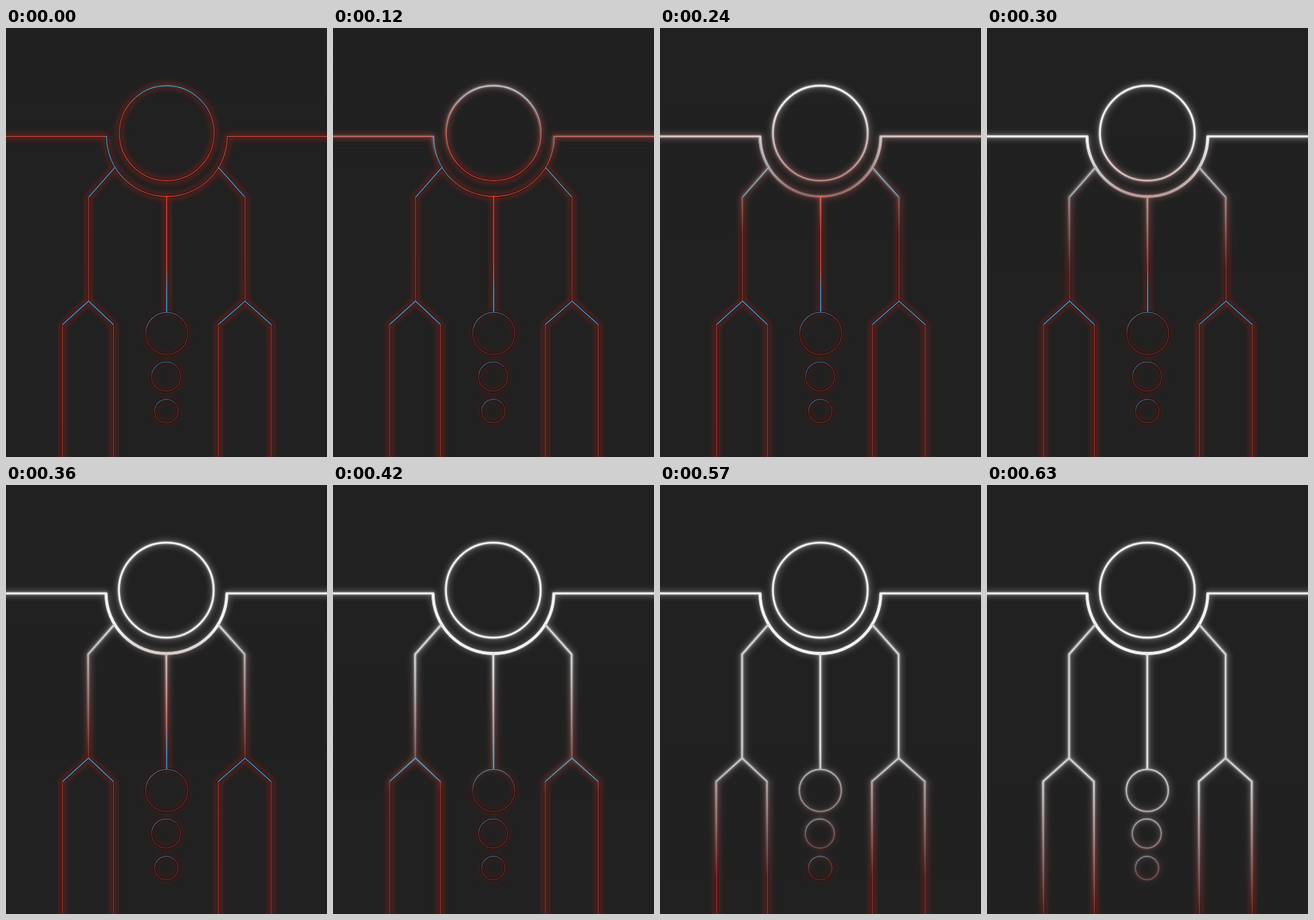
These frames come from a looping animation (420 by 560 pixels, 0.87 s). An HTML page:

```html
<!DOCTYPE html>
<html lang="en">
<head>
<meta charset="utf-8">
<title>Circuit glow</title>
<style>
  html, body { margin: 0; width: 100%; height: 100%; overflow: hidden; background: #212121; }
  svg { position: absolute; left: 0; top: 0; width: 420px; height: 560px; background: #212121; fill: none; }

  .glow { filter: url(#soft); }
  .halo { filter: url(#tight); }

  /* Lit layer: a soft edge sweeps down, then rests */
  .lit {
    --edge: 960px;
    -webkit-mask: linear-gradient(#000 790px, transparent var(--edge)) 0 0 / 100% var(--edge) no-repeat;
    mask: linear-gradient(#000 790px, transparent var(--edge)) 0 0 / 100% var(--edge) no-repeat;
    animation: sweep 870ms infinite;
  }
  @keyframes sweep {
    0% { -webkit-mask-position: 0 -868px; mask-position: 0 -868px; animation-timing-function: steps(21, end); }
    72.4138%, 100% { -webkit-mask-position: 0 -402px; mask-position: 0 -402px; }
  }
</style>
</head>
<body>
<svg viewBox="0 0 420 560">
  <defs>
    <path id="frame" d="M-20 141.5H131.5A78.5 78 0 0 0 289.5 141.5H440"/>
    <circle id="ring" cx="210.3" cy="137.3" r="62"/>
    <path id="limbs" d="M142.5 182L108 221V356.5M74 580V387L108 356.5L140.5 387V580
                        M278 182L312.8 221V356.5M277.8 580V387L312.8 356.5L347 387V580"/>
    <path id="stem" d="M210.3 219V371"/>
    <g id="orbs">
      <circle cx="210.3" cy="398.7" r="27.5"/>
      <circle cx="209.5" cy="455" r="19"/>
      <circle cx="209.8" cy="500" r="15.3"/>
    </g>
    <g id="lines">
      <use href="#frame"/><use href="#ring"/><use href="#limbs"/><use href="#stem"/>
    </g>

    <filter id="soft" filterUnits="userSpaceOnUse" x="-20" y="-20" width="460" height="600">
      <feGaussianBlur stdDeviation="4"/>
    </filter>
    <filter id="tight" filterUnits="userSpaceOnUse" x="-20" y="-20" width="460" height="600">
      <feGaussianBlur stdDeviation="1.1"/>
    </filter>

    <linearGradient id="frameInk" gradientUnits="userSpaceOnUse" x1="0" x2="420" y1="0" y2="0">
      <stop offset=".305" stop-color="#c2493c"/>
      <stop offset=".312" stop-color="#4a8fb4"/>
      <stop offset=".345" stop-color="#41829f"/>
      <stop offset=".4" stop-color="#a83a30"/>
      <stop offset=".5" stop-color="#d8402c"/>
      <stop offset=".64" stop-color="#a03a32"/>
      <stop offset=".69" stop-color="#b0483e"/>
      <stop offset=".7" stop-color="#c2493c"/>
    </linearGradient>
    <linearGradient id="ringInk" gradientUnits="userSpaceOnUse" x1="218" x2="200" y1="75" y2="200">
      <stop offset="0" stop-color="#3f97c4"/>
      <stop offset=".1" stop-color="#4189ad"/>
      <stop offset=".27" stop-color="#b0453b"/>
      <stop offset=".5" stop-color="#b83226"/>
      <stop offset="1" stop-color="#d8402e"/>
    </linearGradient>
    <linearGradient id="limbInk" gradientUnits="userSpaceOnUse" x1="0" x2="0" y1="182" y2="560">
      <stop offset="0" stop-color="#4295bd"/>
      <stop offset=".1" stop-color="#4295bd"/>
      <stop offset=".104" stop-color="#a83a32"/>
      <stop offset=".46" stop-color="#a62f26"/>
      <stop offset=".462" stop-color="#3f9ccb"/>
      <stop offset=".54" stop-color="#3f9ccb"/>
      <stop offset=".545" stop-color="#a83228"/>
      <stop offset="1" stop-color="#a83026"/>
    </linearGradient>
    <linearGradient id="stemInk" gradientUnits="userSpaceOnUse" x1="0" x2="0" y1="219" y2="371">
      <stop offset="0" stop-color="#e23c28"/>
      <stop offset=".58" stop-color="#d8412f"/>
      <stop offset=".76" stop-color="#6f7f94"/>
      <stop offset=".85" stop-color="#3498cb"/>
    </linearGradient>
    <linearGradient id="orbInk" x1=".2" x2=".6" y1="0" y2="1">
      <stop offset="0" stop-color="#3f7f9f"/>
      <stop offset=".22" stop-color="#41657a"/>
      <stop offset=".4" stop-color="#702a26"/>
      <stop offset="1" stop-color="#7c2c27"/>
    </linearGradient>
  </defs>

  <g class="glow" stroke="#b4241a" stroke-width="5" opacity=".62">
    <use href="#lines"/>
    <use href="#orbs" opacity=".35"/>
  </g>
  <g stroke="#120f0f" stroke-opacity=".75" stroke-width="3">
    <use href="#lines"/>
    <use href="#orbs"/>
  </g>
  <g stroke-width="1.3">
    <use href="#frame" stroke="url(#frameInk)"/>
    <use href="#ring" stroke="url(#ringInk)"/>
    <use href="#limbs" stroke="url(#limbInk)"/>
    <use href="#stem" stroke="url(#stemInk)" stroke-width="1.6"/>
    <use href="#orbs" stroke="url(#orbInk)" stroke-width="1.1"/>
  </g>
</svg>

<svg class="lit" viewBox="0 0 420 560">
  <g class="glow" stroke="#b9b9b9" stroke-width="5" opacity=".55">
    <use href="#lines"/>
    <use href="#orbs" opacity=".7"/>
  </g>
  <g class="halo" stroke="#ddd" stroke-width="3.4" opacity=".6" transform="translate(-.6 0)">
    <use href="#lines"/>
    <use href="#orbs" stroke-width="2.4"/>
  </g>
  <g stroke="#f2f2f2" stroke-width="2.2" transform="translate(-.6 0)">
    <use href="#frame" stroke-width="2.6"/>
    <path d="M131.5 141.5A78.5 78 0 0 0 289.5 141.5" stroke-width="3.8"/>
    <use href="#ring" stroke-width="2.4"/>
    <use href="#limbs" stroke="#d6d6d6" stroke-width="2"/>
    <use href="#stem" stroke="#e2e2e2"/>
    <use href="#orbs" stroke="#cfcfcf" stroke-width="1.5"/>
  </g>
</svg>
</body>
</html>
```
